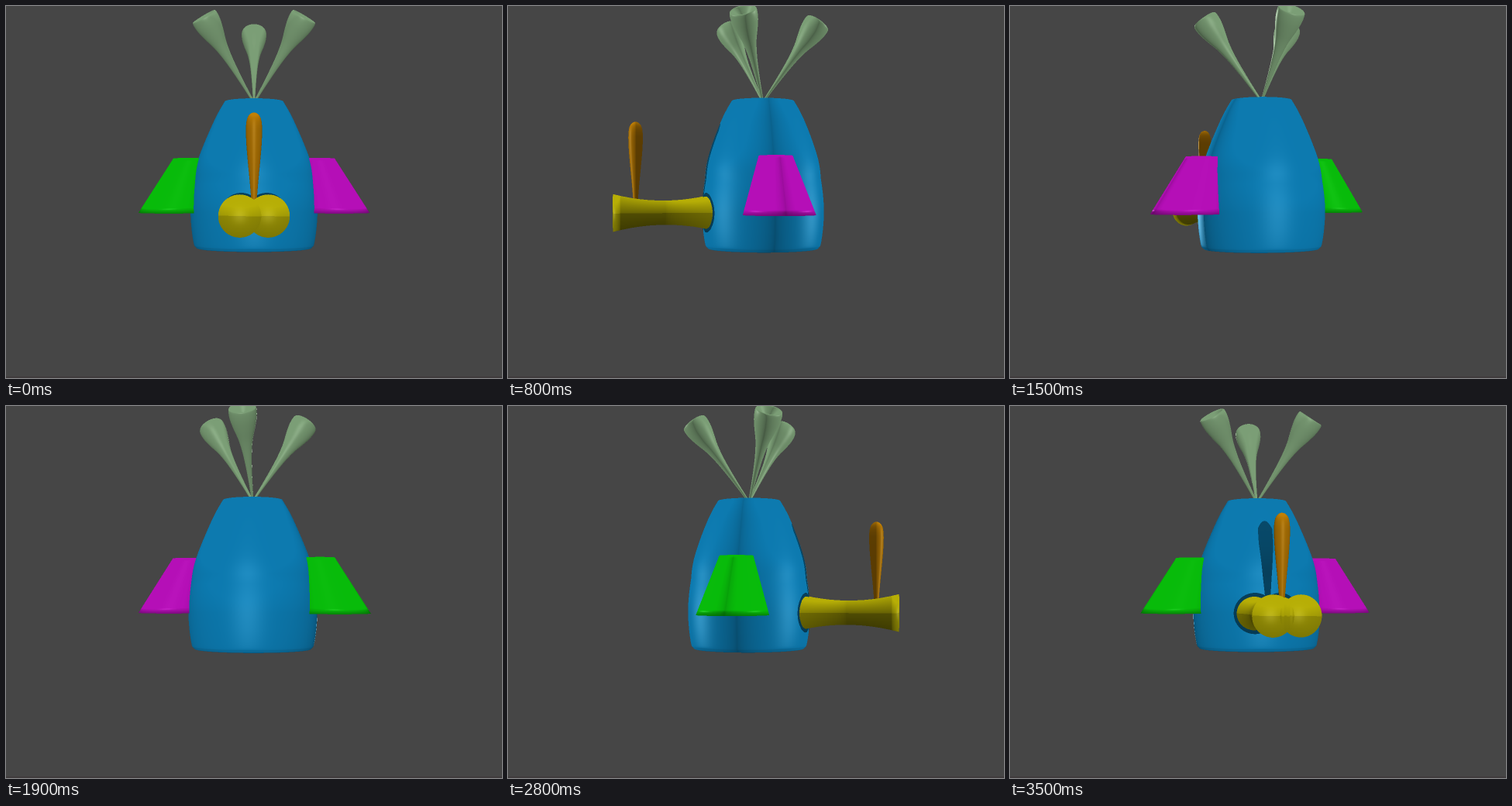
An HTML page with a canvas for the animation above (3600 ms loop, 640 by 480 pixels).

```html
<!DOCTYPE html>
<html lang="en">
<head>
<meta charset="utf-8">
<title>Turntable</title>
<style>
html, body { margin: 0; width: 100%; height: 100%; overflow: hidden; background: #464646; }
canvas { display: block; width: 640px; height: 480px; }
</style>
</head>
<body>
<canvas id="stage" width="640" height="480"></canvas>
<script>
const STEP = 100, STEPS = 36;
const DIST = 1115, CX = 320, CY = 240;
const SS = 2, W = 640 * SS, H = 330 * SS;   // supersampled drawing area
const SIDES = 44, BACK = -9;

const stage = document.getElementById('stage').getContext('2d');
const hiCanvas = document.createElement('canvas');
hiCanvas.width = W;
hiCanvas.height = H;
const hi = hiCanvas.getContext('2d');
const image = hi.createImageData(W, H);
const pixels = image.data;
const depth = new Float32Array(W * H);

const clamp = (v, a, b) => Math.max(a, Math.min(b, v));

// Catmull-Rom through a few profile points
function spline(points, sub = 5) {
  const out = [];
  const at = i => points[clamp(i, 0, points.length - 1)];
  for (let i = 0; i < points.length - 1; i++) {
    const [a, b, c, d] = [at(i - 1), at(i), at(i + 1), at(i + 2)];
    for (let k = 0; k < sub; k++) {
      const t = k / sub;
      out.push([0, 1].map(j => b[j] + 0.5 * t * (c[j] - a[j] +
        t * (2 * a[j] - 5 * b[j] + 4 * c[j] - d[j] + t * (3 * (b[j] - c[j]) + d[j] - a[j])))));
    }
  }
  out.push(at(points.length - 1));
  return out.map(([t, r]) => [t, Math.max(0, r)]);
}

// Sweeps a profile of [position, radius] rows around an axis
function lathe(look, rows, center, u, v, squash = () => 1) {
  const pos = [], nor = [], tris = [];
  let outward = 0;
  rows.forEach(([t, r]) => {
    const c = center(t), k = squash(t);
    for (let s = 0; s < SIDES; s++) {
      const a = s / SIDES * 2 * Math.PI, p = r * Math.cos(a), q = r * k * Math.sin(a);
      pos.push([0, 1, 2].map(j => c[j] + u[j] * p + v[j] * q));
      nor.push([0, 0, 0]);
    }
  });
  const addTri = (a, b, c, mid) => {
    const [A, B, C] = [pos[a], pos[b], pos[c]];
    const e = [0, 1, 2].map(j => B[j] - A[j]), f = [0, 1, 2].map(j => C[j] - A[j]);
    const n = [e[1] * f[2] - e[2] * f[1], e[2] * f[0] - e[0] * f[2], e[0] * f[1] - e[1] * f[0]];
    for (let j = 0; j < 3; j++) {
      nor[a][j] += n[j]; nor[b][j] += n[j]; nor[c][j] += n[j];
      outward += n[j] * (A[j] - mid[j]);
    }
    tris.push([a, b, c]);
  };
  for (let i = 0; i < rows.length - 1; i++) {
    const mid = center((rows[i][0] + rows[i + 1][0]) / 2);
    for (let s = 0; s < SIDES; s++) {
      const n = (s + 1) % SIDES, a = i * SIDES + s, b = i * SIDES + n;
      addTri(a, b, b + SIDES, mid);
      addTri(a, b + SIDES, a + SIDES, mid);
    }
  }
  const sign = outward < 0 ? -1 : 1;
  if (sign < 0) tris.forEach(t => t.reverse());
  nor.forEach(n => {
    const len = sign * Math.hypot(...n) || 1;
    n.forEach((c, j) => n[j] = c / len);
  });
  return { look, pos, nor, tris };
}

const X = [1, 0, 0], Y = [0, 1, 0], Z = [0, 0, 1];

const LOOKS = {
  body: { color: [12, 116, 167], ambient: 0.66, back: 1, shaded: true },
  green: { color: [8, 178, 10], ambient: 0.66, back: 1 },
  magenta: { color: [172, 14, 174], ambient: 0.66, back: 1 },
  leaf: { color: [117, 150, 112], ambient: 0.64, back: 1 },
  nose: { color: [174, 166, 6], ambient: 0.46, back: 0, seam: 0.13 },
  stick: { color: [184, 122, 5], ambient: 0.5, back: 0 }
};

const bodyRows = [[-117, 0], [-117, 20], [-117, 36], [-115, 39.5], [-90, 53], [-43, 72.5], [-10, 79.5],
  [20, 82.5], [45, 81.5], [66, 78.5], [71, 76], [73.5, 70], [73.5, 40], [73.5, 0]];
const leafRows = [[0, 1.2], [0.2, 2.3], [0.4, 4], [0.55, 6], [0.68, 9], [0.8, 13.5], [0.9, 16.5],
  [0.98, 17], [1, 15], [0.97, 11], [0.92, 5], [0.9, 0]];
const stickRows = [[-88.5, 0], [-87, 4], [-82, 7.5], [-72, 9], [-55, 8.6], [-35, 7], [-10, 4.6], [10, 3], [18, 2.5]];
const coneRows = [[-43.5, 0], [-43.5, 20.4], [-40, 21.5], [20, 40.8], [27, 43], [27, 0]];

const noseRows = [];
for (let z = 50; z <= 182; z += 11) noseRows.push([z, 15 + 8.3 * ((z - 118) / 64) ** 2]);
noseRows.push([182, 0]);

const cone = (look, side) => lathe(look, coneRows,
  y => [side * (84.5 + (y + 43.5) * 0.319), y, BACK], X, Z);

const tube = x => lathe(LOOKS.nose, noseRows, z => [x, 26, z], X, Y);

function leaf(deg) {
  const a = deg * Math.PI / 180, s = Math.sin(a), c = Math.cos(a);
  const out = 73, up = 105, len = Math.hypot(out, up);
  return lathe(LOOKS.leaf, spline(leafRows, 4),
    t => [s * out * t, -116 - up * t, BACK + c * out * t],
    [c, 0, -s], [s * up / len, out / len, c * up / len]);
}

const parts = [
  lathe(LOOKS.body, spline(bodyRows), y => [0, y, BACK], X, Z,
    y => 1.06 - 0.11 * clamp((y + 117) / 100, 0, 1)),
  cone(LOOKS.green, -1), cone(LOOKS.magenta, 1),
  leaf(60), leaf(-60), leaf(180),
  tube(-15.4), tube(15.4),
  lathe(LOOKS.stick, spline(stickRows), y => [0, y, 154], X, Z)
];

// Shadow that the nose and the stick throw straight back onto the body
function inShadow(x, y) {
  if (Math.hypot(Math.abs(x) - 15.4, y - 26) < 25) return true;
  if (y < -88 || y > 18) return false;
  const r = y < -78 ? 9 * Math.sqrt((y + 88) / 10) : 9 - 6 * Math.max(0, (y + 60) / 70);
  return Math.abs(x) < r;
}

// Two opposite lights along the model's own z axis
function shade(look, nx, ny, nz, x, y, view, o) {
  const isBack = nz < 0;
  let lit = isBack ? look.back : 1, dim = 1;
  if (look.shaded && !isBack && inShadow(x, y)) { lit = 0; dim = 0.78; }
  const up = ny < 0 ? -0.4 * ny : -0.1 * ny;
  let level = look.ambient + up + 0.36 * lit * Math.sqrt(Math.abs(nz));
  if (look.seam && ny < 0) level += look.seam;
  level = Math.min(1.05, level) * dim;
  let gloss = 0;
  if (lit) {
    const hx = view.s, hz = view.c + (isBack ? -1 : 1);
    const len = Math.hypot(hx, hz) || 1;
    const nh = (nx * hx + nz * hz) / len;
    if (nh > 0.8) {
      const hv = (hx * view.s + hz * view.c) / len;
      gloss = 70 * (0.3 + 2 * (1 - hv) ** 2) * nh ** 40;
    }
  }
  for (let j = 0; j < 3; j++) pixels[o + j] = look.color[j] * level + gloss;
  pixels[o + 3] = 255;
}

function drawPart(part, view) {
  const { look, pos, nor, tris } = part;
  const scr = pos.map(([x, y, z]) => {
    const w = DIST / (DIST - (x * view.s + z * view.c));
    return [(CX + (x * view.c - z * view.s) * w) * SS, (CY + y * w) * SS, w];
  });
  for (const [a, b, c] of tris) {
    const A = scr[a], B = scr[b], C = scr[c];
    const area = (B[0] - A[0]) * (C[1] - A[1]) - (B[1] - A[1]) * (C[0] - A[0]);
    if (area <= 1e-6) continue;
    const x0 = Math.max(0, Math.floor(Math.min(A[0], B[0], C[0])));
    const x1 = Math.min(W - 1, Math.ceil(Math.max(A[0], B[0], C[0])));
    const y0 = Math.max(0, Math.floor(Math.min(A[1], B[1], C[1])));
    const y1 = Math.min(H - 1, Math.ceil(Math.max(A[1], B[1], C[1])));
    const na = nor[a], nb = nor[b], nc = nor[c], pa = pos[a], pb = pos[b], pc = pos[c];
    for (let py = y0; py <= y1; py++) {
      for (let px = x0; px <= x1; px++) {
        const sx = px + 0.5, sy = py + 0.5;
        const i = ((B[0] - sx) * (C[1] - sy) - (B[1] - sy) * (C[0] - sx)) / area;
        const j = ((C[0] - sx) * (A[1] - sy) - (C[1] - sy) * (A[0] - sx)) / area;
        const k = 1 - i - j;
        if (i < -1e-7 || j < -1e-7 || k < -1e-7) continue;
        const w = i * A[2] + j * B[2] + k * C[2], cell = py * W + px;
        if (w <= depth[cell]) continue;
        depth[cell] = w;
        const nx = i * na[0] + j * nb[0] + k * nc[0];
        const ny = i * na[1] + j * nb[1] + k * nc[1];
        const nz = i * na[2] + j * nb[2] + k * nc[2];
        const len = Math.sqrt(nx * nx + ny * ny + nz * nz) || 1;
        shade(look, nx / len, ny / len, nz / len,
          i * pa[0] + j * pb[0] + k * pc[0], i * pa[1] + j * pb[1] + k * pc[1], view, cell * 4);
      }
    }
  }
}

function render(step) {
  const angle = step / STEPS * 2 * Math.PI;
  const view = { s: Math.sin(angle), c: Math.cos(angle) };
  depth.fill(0);
  pixels.fill(0);
  parts.forEach(p => drawPart(p, view));
  hi.putImageData(image, 0, 0);
  stage.fillStyle = '#464646';
  stage.fillRect(0, 0, 640, 480);
  stage.fillStyle = '#403c3d';
  stage.fillRect(0, 478, 640, 2);
  stage.drawImage(hiCanvas, 0, 0, W / SS, H / SS);
}

const start = performance.now();
let shown = -1;
function tick() {
  const step = Math.floor((performance.now() - start) / STEP) % STEPS;
  if (step !== shown) render(shown = step);
  requestAnimationFrame(tick);
}
tick();
</script>
</body>
</html>
```
